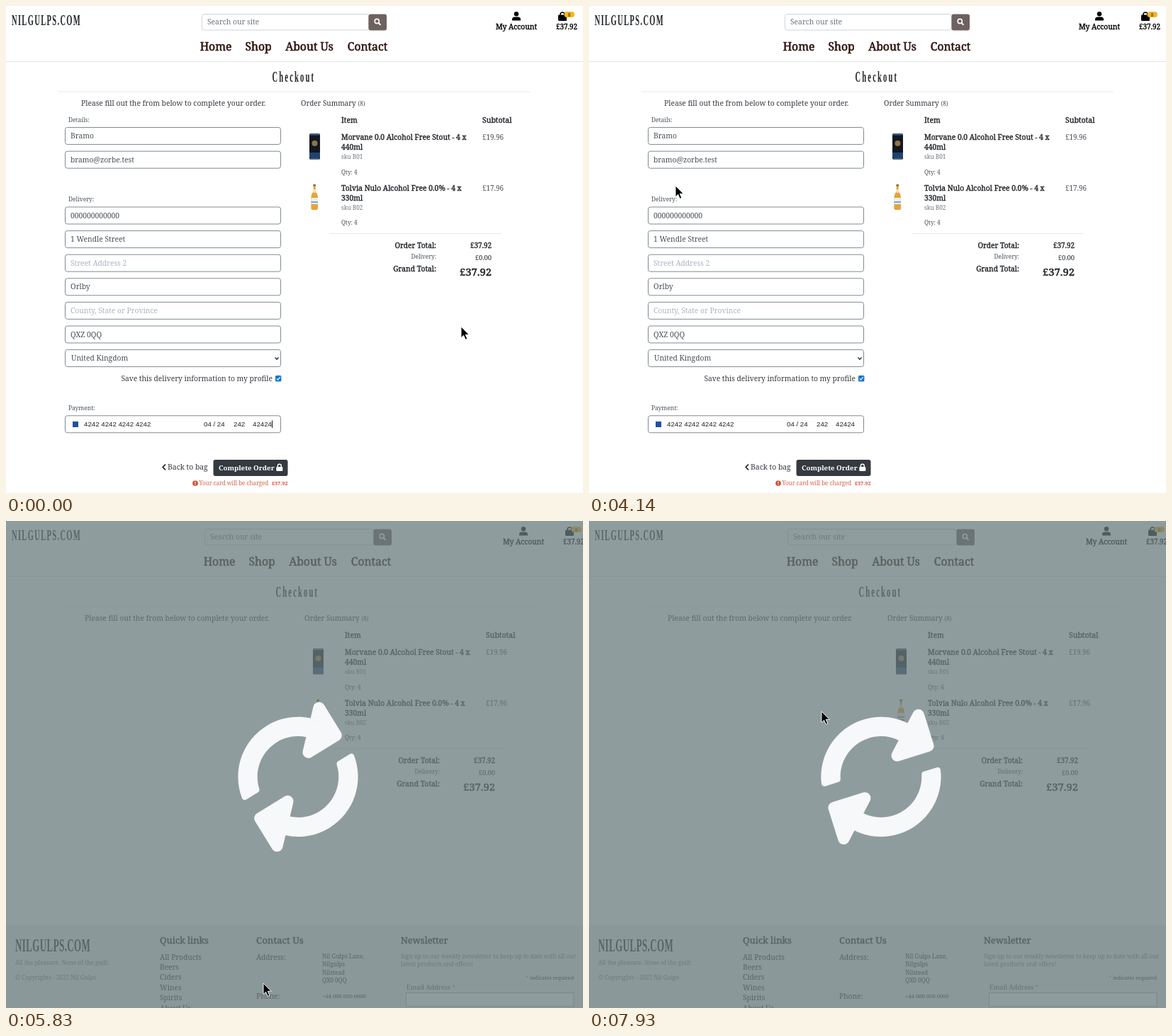
These frames come from a looping animation (814x688 px, 7.99 s). An HTML page:

```html
<!DOCTYPE html>
<html lang="en">
<head>
<meta charset="utf-8">
<title>Checkout</title>
<style>
html, body { margin: 0; width: 100%; height: 100%; overflow: hidden; background: #fff; }
svg { display: block; width: 814px; height: 688px; }
text { font-family: "Noto Serif", serif; fill: currentColor; white-space: pre; }
/* A hairline stroke gives a medium weight between regular and bold */
.semi { stroke: currentColor; stroke-width: .037em; }
.bold { font-weight: 700; }
.mid { text-anchor: middle; }
.end { text-anchor: end; }
.sans { font-family: "Liberation Sans", Arial, sans-serif; }
.narrow { font-family: "Liberation Serif", serif; font-weight: 700; }
</style>
</head>
<body>
<svg id="stage" viewBox="0 0 814 688" xmlns="http://www.w3.org/2000/svg"></svg>
<script>
const LOOP = 7990, CLICK = 4940, FADE_START = 4986, FADE = 100;
const DARK = '#212529', SOFT = '#495057', MUTED = '#6c757d', BROWN = '#30140f';
const stage = document.getElementById('stage');

const text = (x, y, str, size = 10.2, color = DARK, cls = '') =>
  `<text x="${x}" y="${y}" font-size="${size}" color="${color}" class="${cls}">${str}</text>`;
const narrow = (x, y, str, size, spacing) =>
  `<text transform="translate(${x} ${y}) scale(.5 1)" font-size="${size}" letter-spacing="${spacing}" color="${DARK}" class="narrow">${str}</text>`;
const rect = (x, y, w, h, fill, rx = 0, extra = '') =>
  `<rect x="${x}" y="${y}" width="${w}" height="${h}" fill="${fill}" rx="${rx}" ${extra}/>`;
const path = (d, fill = 'none', stroke = 'none', width = 1) =>
  `<path d="${d}" fill="${fill}" stroke="${stroke}" stroke-width="${width}"/>`;
const line = (x1, x2, y, color = '#e8e9ea') => path(`M${x1} ${y}H${x2}`, 'none', color);
const group = (id, body) => `<g id="${id}">${body}</g>`;
const outline = color => `stroke="${color}"`;

// Form rows: centre line and the value in each field
const ROW = 33.6;
const fields = [
  [183.5, 'Bramo'], [217.2, 'bramo@zorbe.test'],
  ...['000000000000', '1 Wendle Street', 'Street Address 2', 'Orlby',
    'County, State or Province', 'QXZ 0QQ', 'United Kingdom'].map((s, i) => [296 + i * ROW, s]),
  [590.8, '']
];
const field = ([y, value]) => {
  const hint = /^(Street|County)/.test(value);
  return rect(83.5, y - 12, 304, 24, 'none', 3, outline('#7f8b91')) +
    text(value.startsWith('United') ? 92 : 91, y + 3.6, value, 10.3, hint ? '#a9b5c1' : SOFT);
};

const form = fields.map(field).join('') +
  text(88, 163.5, 'Details:', 8.4, SOFT) +
  text(88, 276, 'Delivery:', 8.4, SOFT) +
  text(88, 571, 'Payment:', 8.4, SOFT) +
  path('M379.5 496.5l2.5 2.7 2.5-2.7', 'none', DARK, 1.3) +
  text(376, 529.5, 'Save this delivery information to my profile', 10.25, '#343a40', 'end') +
  rect(380, 522, 8.4, 8.4, '#0b76d8', 1.5) +
  path('M381.8 526.3l1.8 1.9 3.2-4', 'none', '#fff', 1.2) +
  rect(94, 587, 8, 8, '#1f4fa3', 0, 'id="card"') +
  [[110, '4242 4242 4242 4242'], [279, '04 / 24'], [321, '242'], [348, '42424']]
    .map(([x, s]) => text(x, 594.3, s, 9.7, DARK, 'sans')).join('') +
  rect(375, 585.5, 1, 10.5, '#111', 0, 'id="caret"') +
  path('M225 647.5l-3.7 4 3.7 4', 'none', DARK, 1.8) +
  text(228, 655, 'Back to bag', 10.4, '#343a40') +
  group('button', rect(292.5, 641, 105, 23, '#343a40', 3) +
    text(300, 655.6, 'Complete Order', 9.7, '#fff', 'bold') +
    rect(381.3, 651, 9, 6, '#fff', 1) +
    path('M383.3 651.5v-1.7a2.5 2.5 0 0 1 5 0v1.7', 'none', '#fff', 1.4)) +
  '<circle cx="267" cy="674.3" r="3.8" fill="#d24a38"/>' +
  path('M267 672v2.8M267 675.6v1.2', 'none', '#fff', 1.2) +
  text(272.5, 677.3, 'Your card will be charged', 8, '#d9604a') +
  text(397.5, 677.3, '£37.92', 7.3, '#d24a38', 'bold end');

const can = rect(428, 180, 15, 37, '#14171f', 2.5) +
  rect(428.5, 180, 14, 2.5, '#3c5f8e', 1) + rect(428, 207, 15, 7, '#1c4377') +
  rect(429, 214.5, 13, 2.5, '#4b6384', 1) + '<circle cx="435.5" cy="194" r="4" fill="#8d744b"/>';
const bottle = path('M433.7 252h3v10q3.3 4 3.3 8v16q0 2-2 2h-5.6q-2 0-2-2v-16q0-4 3.3-8z', '#e5a33d') +
  rect(433.5, 252, 3.4, 2.5, '#83683a') + rect(433.7, 259, 3, 5, '#f2e3bd') +
  rect(430.4, 271, 9.6, 9, '#e9eef3') + rect(430.4, 276, 9.6, 2, '#7fa7d0');

const item = (y, first, second, sku, price) =>
  text(473, y, first, 10.3, DARK, 'semi') + text(473, y + 14.4, second, 10.3, DARK, 'semi') +
  text(473, y + 27.2, 'sku ' + sku, 8.2, MUTED) + text(473, y + 48.7, 'Qty: 4', 8.2, SOFT) +
  text(672, y + .2, price, 9.9, SOFT);
const total = (y, label, amount, size, cls, amountSize, drop = 0) =>
  text(607, y, label, size, cls ? DARK : SOFT, cls + ' end') +
  text(685, y + drop, amount, amountSize, DARK, cls + ' end');

const nav = [[296, 'Home'], [356, 'Shop'], [428, 'About Us'], [510, 'Contact']];
const centre = nav.map(([x, s]) => text(x, 62.7, s, 15.7, BROWN, 'semi mid')).join('') +
  narrow(375.5, 107, 'Checkout', 21, 4.4) +
  line(74, 740, 121) +
  text(106, 141.2, 'Please fill out the from below to complete your order.', 10.3, '#343a40') +
  text(416, 141.2, 'Order Summary', 10, '#343a40') + text(496.5, 141.2, '(8)', 8, SOFT) +
  text(473, 165, 'Item', 10.3, DARK, 'semi') + text(672, 165, 'Subtotal', 10.5, DARK, 'semi') +
  can + bottle +
  item(189, 'Morvane 0.0 Alcohol Free Stout - 4 x', '440ml', 'B01', '£19.96') +
  item(260.5, 'Tolvia Nulo Alcohol Free 0.0% - 4 x', '330ml', 'B02', '£17.96') +
  line(456, 699, 321.5) +
  total(341.7, 'Order Total:', '£37.92', 10.2, 'semi', 9.9) +
  total(357, 'Delivery:', '£0.00', 8.2, '', 9.4, 1.5) +
  total(374.8, 'Grand Total:', '£37.92', 10.3, 'semi', 14.8, 6.2);

const account = '<circle cx="720" cy="11.2" r="3.2"/>' +
  path('M714 20.5v-1.5q0-3.5 3.5-3.5h5q3.5 0 3.5 3.5v1.5z', '#000') +
  text(720, 33, 'My Account', 10.3, '#000', 'semi mid') +
  rect(779, 12.5, 12, 8.5, '#000', 1.2) +
  path('M782 14v-2a3 3 0 0 1 6 0v2', 'none', '#000', 1.6) +
  rect(787.5, 8, 14.5, 8, '#f7b51e', 4) + text(794.7, 14.6, '8', 6.8, DARK, 'mid') +
  text(791, 33, '£37.92', 9.9, '#000', 'semi mid');

const searchButton = rect(511.5, 11.5, 25.5, 23, '#6e6160', 3) +
  '<circle cx="523.3" cy="21.5" r="3.1" fill="none" stroke="#fff" stroke-width="1.6"/>' +
  path('M525.7 24l2.8 2.8', 'none', '#fff', 1.9);

const list = (x, y, step, rows, size, color) =>
  rows.map((s, i) => text(x, y + i * step, s, size, color)).join('');
const star = '<tspan fill="#e85c41">*</tspan>';
const footer = rect(0, 571, 814, 117, '#f1f1f1') +
  narrow(13, 608, 'NILGULPS.COM', 26, .8) +
  text(13, 627, 'All the pleasure. None of the guilt.', 8.2, MUTED) +
  text(13, 648, '© Copyrights - 2022 Nil Gulps', 8.2, MUTED) +
  text(217, 596.5, 'Quick links', 12.9, DARK, 'semi') +
  list(217, 619.5, 14.4, ['All Products', 'Beers', 'Ciders', 'Wines', 'Spirits', 'About Us'], 10.2, DARK) +
  text(353, 596.5, 'Contact Us', 13.3, DARK, 'semi') +
  text(353, 619.5, 'Address:') + text(353, 675, 'Phone:') +
  list(446, 617.5, 11.6, ['Nil Gulps Lane,', 'Nilgulps', 'Nilstead', 'QX0 0QQ'], 8.2, DARK) +
  text(446, 674, '+44 000 000 0000', 7.7) +
  text(557, 596.5, 'Newsletter', 12.9, DARK, 'semi') +
  list(557, 617.5, 11.5, ['Sign up to our weekly newsletter to keep up to date with all our',
    'latest products and offers!'], 8.2, MUTED) +
  text(801, 648, star + ' indicates required', 7.1, DARK, 'end') +
  text(565, 661.5, 'Email Address ' + star, 9.1, SOFT) +
  rect(564.5, 666.5, 236.5, 19.5, '#fff', 0, outline('#abb0b2'));

const halfArrow = '<path id="half" d="M370.7 133.3C339.5 104 298.9 88 255.8 88c-77.4.1-144.3 53.2-162.7 126.9-1.4 5.3-6.2 9.1-11.7 9.1H24.1c-7.5 0-13.2-6.8-11.8-14.2C33.9 94.9 134.8 8 256 8c66.4 0 126.8 26.1 171.3 68.7L463 41C478.1 25.9 504 36.6 504 57.9V192c0 13.3-10.7 24-24 24H345.9c-21.4 0-32.1-25.9-16.9-41z"/>';
const spinner = `<g id="spinner" fill="#fbfcfd" fill-opacity=".96">${halfArrow}<use href="#half" transform="rotate(180 256 256)"/></g>`;

const pointer = group('arrow', '<path d="M0 0V15.7L3.6 12.3 6.2 18.3 8.8 17.2 6.2 11.3H11.2Z" stroke="#fff" stroke-width=".9"/>') +
  group('beam', path('M-2.5-6h1.7L0-5.4.8-6h1.7M0-5.4V5.4M-2.5 6h1.7L0 5.4.8 6h1.7', 'none', '#222', 1.1));

stage.innerHTML =
  rect(0, 0, 814, 688, '#fff') +
  narrow(8, 27, 'NILGULPS.COM', 21, 2.7) +
  group('searchBox', rect(276.5, 11.5, 235, 22.5, '#fff', 3, 'id="searchField" ' + outline('#ced4da')) +
    text(284, 26.3, 'Search our site', 10.3, MUTED)) +
  group('searchButton', searchButton) +
  line(0, 814, 78.5, '#e3e4e6') +
  group('account', account) + group('centre', centre) + group('form', form) + group('footer', footer) +
  group('overlay', rect(0, 0, 814, 688, '#6a7b7c', 0, 'fill-opacity=".75"') + spinner) +
  group('cursor', pointer);

const part = id => document.getElementById(id);
const set = (id, name, value) => part(id).setAttribute(name, value);
const shift = (id, x, y = 0) => set(id, 'transform', `translate(${x} ${y})`);
const show = (id, on) => set(id, 'visibility', on ? 'visible' : 'hidden');

// Cursor stops: time, x, y
const stops = [
  [0, 642, 453], [330, 642, 453], [560, 672, 340], [760, 690, 288], [1090, 699, 380], [1230, 708, 398],
  [1440, 600, 310], [1700, 300, 170], [1930, 113, 128], [2180, 4, 180], [2420, 60, 235],
  [2690, 141, 180], [2960, 141, 180], [3120, 270, 200], [3250, 374, 330], [3390, 270, 585], [3520, 70, 560],
  [3640, 15, 400], [3810, 122, 254], [4140, 122, 254], [4380, 400, 300], [4540, 504, 430],
  [4720, 400, 640], [4860, 363, 653], [6400, 363, 653], [6570, 357, 515], [6800, 337, 320],
  [7040, 334, 281], [7400, 328, 269], [LOOP, 328, 269]
];

// Cubic interpolation that rests wherever two equal stops meet
function cursorAt(t) {
  const i = Math.max(0, stops.findIndex(s => s[0] > t) - 1);
  const a = stops[i], b = stops[i + 1], span = b[0] - a[0], u = (t - a[0]) / span;
  const same = (p, q) => p[1] === q[1] && p[2] === q[2];
  const slope = (k, axis) => {
    const p = stops[k - 1], s = stops[k], n = stops[k + 1];
    return !p || !n || same(p, s) || same(s, n) ? 0 : (n[axis] - p[axis]) / (n[0] - p[0]);
  };
  return [1, 2].map(axis => {
    const d = b[axis] - a[axis], m0 = slope(i, axis) * span, m1 = slope(i + 1, axis) * span;
    return a[axis] + u * (m0 + u * (3 * d - 2 * m0 - m1 + u * (m0 + m1 - 2 * d)));
  });
}

function draw(t) {
  const p = Math.min(1, Math.max(0, (t - FADE_START) / FADE));
  const fade = .5 - Math.cos(Math.PI * p) / 2;
  const wide = p === 1, clicked = t >= CLICK;

  shift('searchBox', wide ? 4 : 0);
  set('searchField', 'width', wide ? 238 : 235);
  shift('searchButton', wide ? 7 : 0);
  shift('account', wide ? 10 : 0);
  shift('centre', wide ? 5 : 0);
  set('form', 'opacity', 1 - fade);
  set('overlay', 'opacity', fade);
  show('footer', wide);

  set('button', 'opacity', clicked ? .68 : 1);
  set('card', 'fill', clicked ? '#b9bcc0' : '#1f4fa3');
  // The text caret toggles every 530 ms
  show('caret', !clicked && Math.floor((t + 30) / 530) % 2 === 0);

  const angle = 3.8 + .1782 * (t - 7040);
  set('spinner', 'transform', `translate(${wide ? 412 : 407} 361.4) rotate(${angle}) scale(.341) translate(-256 -256)`);

  const [x, y] = cursorAt(t);
  const typing = !clicked && x > 83 && x < 388 && fields.some(([row]) => Math.abs(y - row) < 12);
  shift('cursor', x, y);
  show('arrow', !typing);
  show('beam', typing);
}

const start = performance.now();
function tick() {
  draw((performance.now() - start) % LOOP);
  requestAnimationFrame(tick);
}
tick();
</script>
</body>
</html>
```
